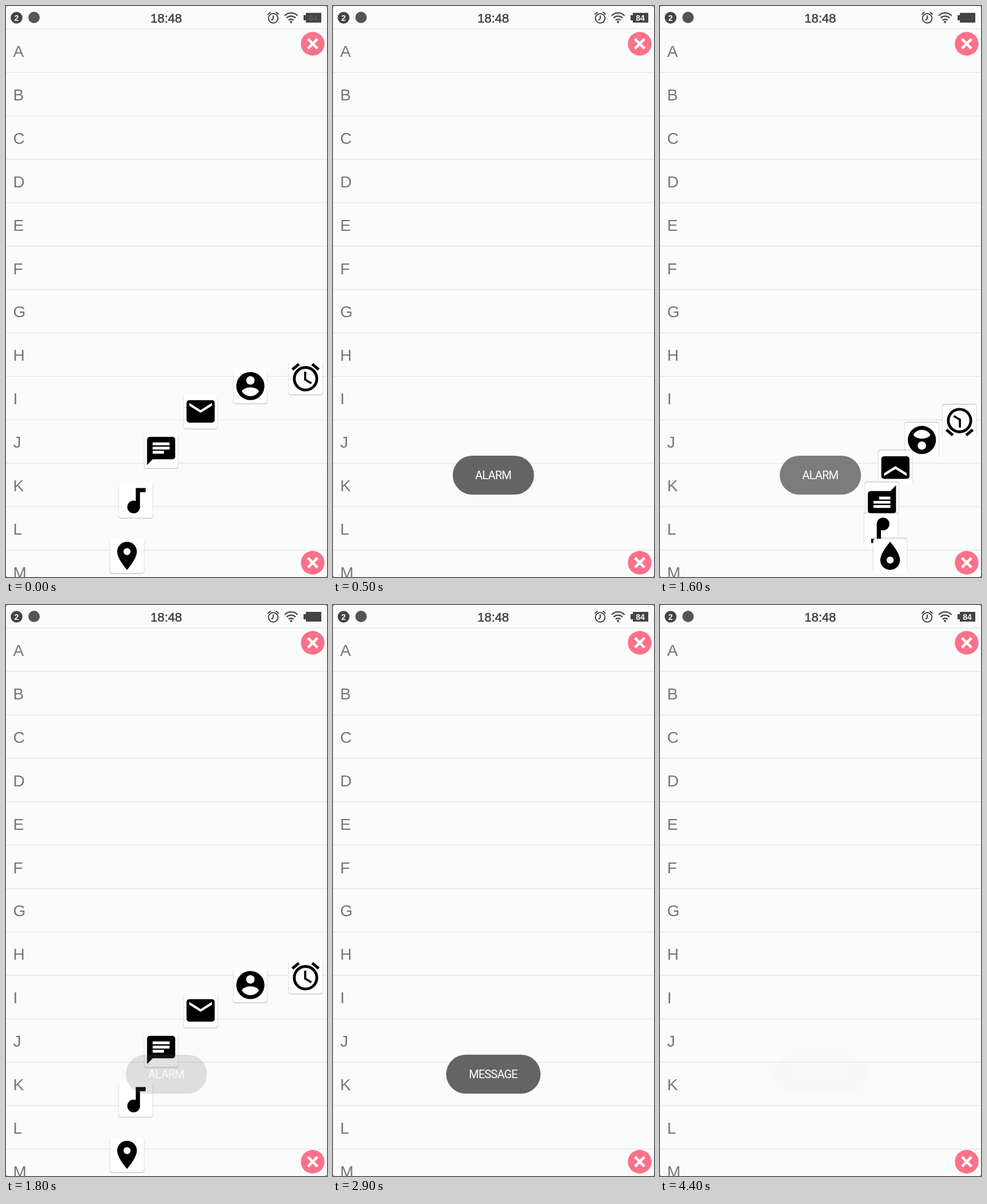
Write an HTML page that moves like this. It is 561 px wide and 998 px high and loops after 6100 ms.

```html
<!DOCTYPE html>
<html lang="en">
<head>
<meta charset="utf-8">
<title>Arc menu</title>
<style>
  html, body { margin: 0; width: 100%; height: 100%; overflow: hidden; background: #555; }
  svg { display: block; width: 561px; height: 998px; }
  text { font-family: "Liberation Sans", Arial, sans-serif; }
  .row { font-size: 28px; fill: #757575; }
  .clock { font-size: 22px; fill: #444; stroke: #444; stroke-width: .6; text-anchor: middle; }
  .small { font-size: 14px; font-weight: bold; fill: #fafafa; text-anchor: middle; }
  .toast text { font: 20px Roboto, sans-serif; letter-spacing: -.8px; fill: #fff; text-anchor: middle; }
  .line { fill: none; stroke: #000; stroke-width: 2; }
</style>
</head>
<body>
<svg viewBox="0 0 561 998">
  <defs>
    <g id="alarm">
      <circle class="line" cx="12" cy="13" r="8"/>
      <path d="M11 8h1.5v5.25l4 2.37-.75 1.23L11 14z"/>
      <path class="line" d="M2.65 6.5L7.25 2.6M21.35 6.5L16.75 2.6"/>
    </g>
    <g id="person">
      <circle cx="12" cy="12" r="10"/>
      <circle cx="12" cy="8" r="3" fill="#fff"/>
      <path fill="#fff" d="M6 15.98c.03-1.99 4-3.08 6-3.08s5.97 1.09 6 3.08a7.2 7.2 0 0 1-12 0z"/>
    </g>
    <g id="mail">
      <rect x="2" y="4" width="20" height="16" rx="2"/>
      <path fill="#fff" d="M4 6l8 5 8-5v2l-8 5-8-5z"/>
    </g>
    <g id="message">
      <path d="M4 2h16a2 2 0 0 1 2 2v12a2 2 0 0 1-2 2H6l-4 4V4a2 2 0 0 1 2-2z"/>
      <path fill="#fff" d="M6 6h12v2H6zM6 9h12v2H6zM6 12h8v2H6z"/>
    </g>
    <g id="music">
      <circle cx="10.5" cy="16.5" r="4.5"/>
      <path d="M12 3h7v3h-4v11h-3z"/>
    </g>
    <g id="place">
      <path d="M12 2a7 7 0 0 0-7 7c0 5.25 7 13 7 13s7-7.75 7-13a7 7 0 0 0-7-7z"/>
      <circle cx="12" cy="9" r="2.5" fill="#fff"/>
    </g>
    <g id="hub">
      <circle r="20.7" fill="#fa728a"/>
      <path d="M-8.3-8.3L8.3 8.3M8.3-8.3L-8.3 8.3" stroke="#fff" stroke-width="4.6"/>
    </g>
  </defs>

  <rect width="561" height="998" rx="3" fill="#fbfbfb"/>

  <circle cx="18.5" cy="20.5" r="10.3" fill="#444"/>
  <text class="small" x="18.5" y="25.5">2</text>
  <circle cx="49" cy="20" r="10" fill="#555"/>
  <text class="clock" x="280" y="28.5">18:48</text>
  <g fill="none" stroke="#444" stroke-width="2">
    <circle cx="467" cy="21.5" r="8.3"/>
    <path d="M467 16.5v5.5l-3 3M457.5 15l5-4.500M476.500 15l-5-4.500"/>
    <path stroke-width="2.3" d="M487 17a15.500 15.500 0 0 1 22.500 0M490.500 21a10.600 10.600 0 0 1 15.500 0M494 25a6 6 0 0 1 8.500 0"/>
  </g>
  <circle cx="498.200" cy="28" r="2" fill="#444"/>
  <path fill="#444" d="M524 12h27v17h-27v-4h-4v-9h4z"/>
  <text id="charge" class="small" x="537" y="25.500">84</text>

  <g id="list"></g>
  <use href="#hub" x="536" y="66"/>
  <use id="button" href="#hub"/>
  <g id="items"></g>
  <g id="toasts"></g>
</svg>
<script>
  const LOOP = 6100, STEP = 100, LAST = 4400;
  const HUB = { x: 523.5, y: 961 }, RADIUS = 312;
  const OPEN = 1400, OPEN_TIME = 300, CLICK_TIME = 300;
  const NAMES = ['alarm', 'person', 'mail', 'message', 'music', 'place'];
  const CLICKS = [
    { at: 50, item: 0, label: 'ALARM', width: 142 },
    { at: 2550, item: 3, label: 'MESSAGE', width: 165 }
  ];

  const $ = id => document.getElementById(id);
  const ease = p => (1 - Math.cos(Math.PI * Math.min(1, Math.max(0, p)))) / 2;

  function add(parent, tag, attrs, text = '') {
    const el = document.createElementNS('http://www.w3.org/2000/svg', tag);
    for (const key in attrs) el.setAttribute(key, attrs[key]);
    el.textContent = text;
    return parent.appendChild(el);
  }

  [...'ABCDEFGHIJKLM'].forEach((letter, i) => {
    const y = 40 + i * 75.9;
    add($('list'), 'rect', { y: y - .5, width: 561, height: 1.3, fill: '#e4e4e4' });
    add($('list'), 'text', { class: 'row', x: 12.5, y: y + 49 }, letter);
  });

  const items = NAMES.map((name, i) => {
    const el = add($('items'), 'g', {});
    add(el, 'rect', { x: -30.5, y: -29, width: 61, height: 61, rx: 5, opacity: .06 });
    add(el, 'rect', { x: -30, y: -28, width: 60, height: 59.5, rx: 4, opacity: .12 });
    add(el, 'rect', { x: -29.5, y: -30, width: 59, height: 60, rx: 4, fill: '#fff' });
    add(el, 'use', { href: '#' + name, transform: 'scale(2.46) translate(-12 -12)' });
    const angle = i * Math.PI / 10;
    return { el, dx: -RADIUS * Math.sin(angle), dy: -RADIUS * Math.cos(angle) };
  });

  const toasts = CLICKS.map(({ label, width }) => {
    const el = add($('toasts'), 'g', { class: 'toast' });
    add(el, 'rect', { x: 280.3 - width / 2, y: 786, width, height: 68, rx: 34, fill: '#646464' });
    add(el, 'text', { x: 280, y: 826.5 }, label);
    return el;
  });

  function drawItems(t) {
    const opening = t - OPEN;
    const click = CLICKS[t < OPEN ? 0 : 1];
    const gone = ease((t - click.at) / CLICK_TIME);
    items.forEach(({ el, dx, dy }, i) => {
      const delay = i * 100 / 7;
      const out = t < OPEN ? 1 : ease((opening - delay) / OPEN_TIME);
      const spin = t < OPEN ? 0 : 720 * ease(opening / OPEN_TIME);
      const scale = i === click.item ? 1 + 3 * gone : 1 - gone;
      el.setAttribute('transform',
        `translate(${HUB.x + dx * out} ${HUB.y + dy * out}) rotate(${spin}) scale(${scale})`);
      el.setAttribute('opacity', 1 - gone);
    });
    const turn = 360 * ease(opening / OPEN_TIME);
    $('button').setAttribute('transform', `translate(536 973) rotate(${turn})`);
  }

  function drawToasts(t) {
    toasts.forEach((el, i) => {
      const age = t - CLICKS[i].at;
      const shown = ease((age - 30) / 300);
      const hidden = ease((age - 1435) / 440);
      el.setAttribute('opacity', shown * (1 - hidden));
    });
  }

  function draw(now) {
    // The screen refreshes ten times a second, then rests until the loop restarts.
    const t = Math.min(LAST, Math.floor(now % LOOP / STEP) * STEP);
    drawItems(t);
    drawToasts(t);
    $('charge').setAttribute('opacity', t < 100 ? .12 : t > OPEN && t < 2600 ? 0 : 1);
  }

  const start = performance.now();
  function tick() {
    draw(performance.now() - start);
    requestAnimationFrame(tick);
  }
  tick();
</script>
</body>
</html>
```
